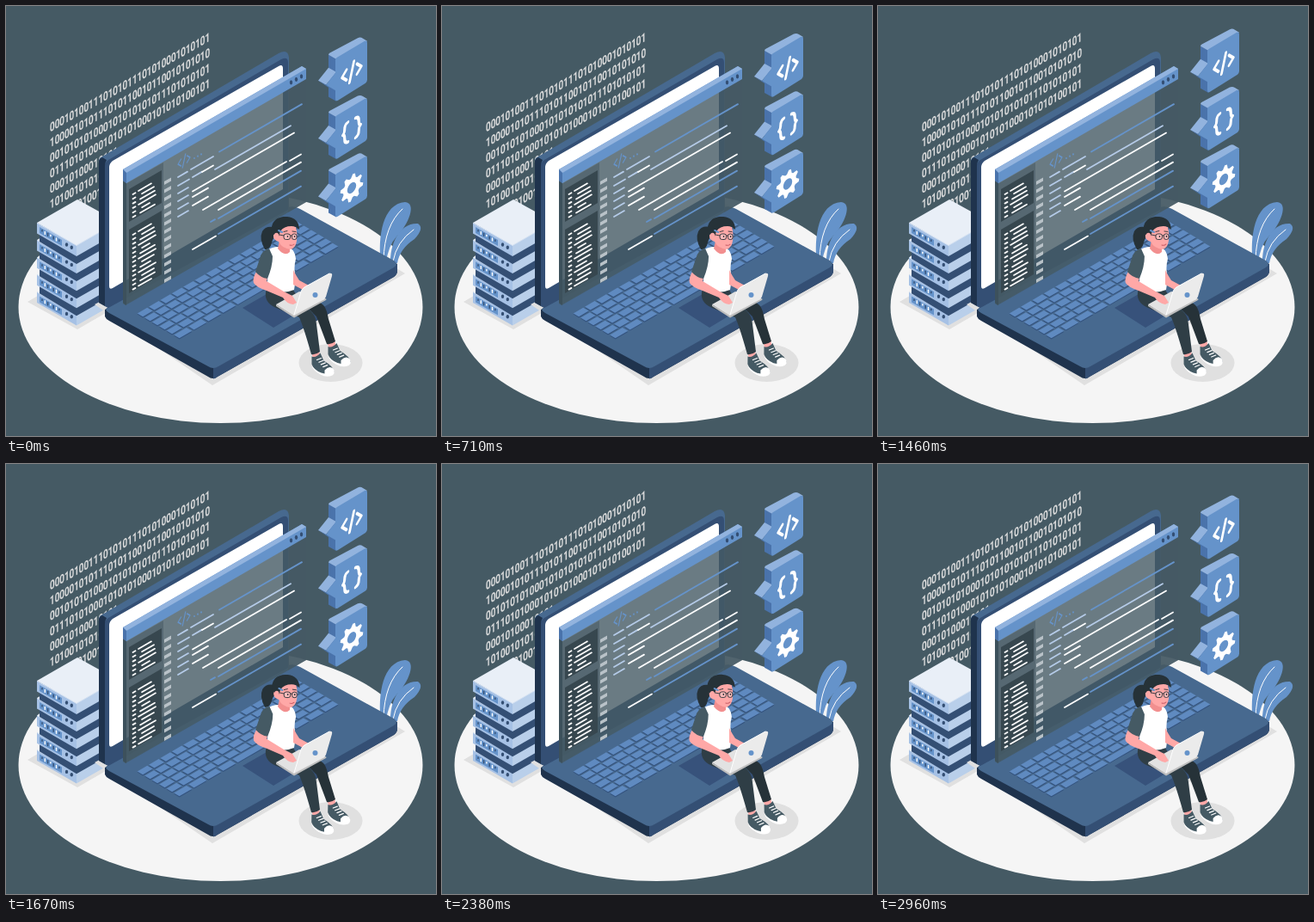
Recreate the animation shown at these times as an HTML page. Size 500 by 500 pixels, loop 3000 ms.

```html
<!DOCTYPE html>
<html lang="en">
<head>
<meta charset="utf-8">
<title>Isometric programming scene</title>
<style>
html,body{margin:0;width:100%;height:100%;overflow:hidden;background:#455a64}
svg{display:block;width:100vw;height:100vh}
</style>
</head>
<body>
<svg id="stage" viewBox="0 0 500 500"></svg>
<script>
const C = {
  bg: '#455a64', ink: '#263238', slate: '#37474f', floor: '#f5f5f5', shade: '#e0e0e0',
  blue: '#6593ca', light: '#92b3de', side: '#4a73ab', navy: '#344f74', deep: '#1f334d',
  base: '#47698f', skin: '#ffa8a7', pale: '#b5cbe8', white: '#fff'
};
const SLOPE = -0.577;
const poly = (pts, fill, extra = '') => `<polygon points="${pts}" fill="${fill}" ${extra}/>`;
const path = (d, fill, extra = '') => `<path d="${d}" fill="${fill}" ${extra}/>`;
const line = (d, color, w = 1.5) => path(d, 'none', `stroke="${color}" stroke-width="${w}" stroke-linecap="round" stroke-linejoin="round"`);
const oval = (x, y, rx, ry, fill, extra = '') => `<ellipse cx="${x}" cy="${y}" rx="${rx}" ry="${ry}" fill="${fill}" ${extra}/>`;
const group = (id, body) => `<g id="${id}">${body}</g>`;
const times = (n, f) => Array.from({length: n}, (_, i) => f(i)).join('');
// Dash running along the left-to-right isometric axis
const dash = (x, y, len, color, w) => line(`M${x} ${y}l${len} ${len * SLOPE}`, color, w);

function binary() {
  const rows = [
    '000101001110101011101010001010101',
    '100001010111010110010110010101010',
    '001010101000101010101011101010101',
    '011101010001010101000101010100101',
    '00010100010101', '10100101010101'
  ];
  const row = (s, x, y) => `<text transform="matrix(.71 -.405 0 1 ${x} ${y})">${s}</text>`;
  return `<g fill="#e0e0e0" stroke="#e0e0e0" stroke-width=".3" font-family="Roboto, Inter, sans-serif" font-size="14" font-weight="500">` +
    rows.map((s, i) => row(s, 51, 146.5 + i * 17.9)).join('') + row('01001', 83, 236) + '</g>';
}

function server(i) {
  const y = i * 20.1;
  const gap = i < 4 ? poly('39,264 82,289 126,264 126,275 82,300 39,274', C.navy) : '';
  return `<g transform="translate(0 ${y})">` + gap +
    poly('36,252 83,225 130,251 82,278.5', '#e9eff7') +
    poly('36,252 82,278.5 82,291 36,264.5', '#a6c1e5') +
    poly('82,278.5 130,251 130,263.5 82,291', '#b9cfea') +
    line('M36.500 252.500L82 278.500L129 251.500', '#d4e1f2', 1) +
    poly('39,257 65,272 65,279 39,264', C.blue) +
    times(7, k => line(`M${42 + k * 3.3} ${260.5 + k * 1.9}v${k % 3 ? 3 : 1.5}`, k % 2 ? C.white : C.navy, 1.4)) +
    oval(70.5, 277.5, 1.7, 2.2, C.navy) + oval(76.3, 280.8, 1.7, 2.2, C.navy) + '</g>';
}

function keyboard() {
  const at = (u, v) => [152 + 187 * u + 51 * v, 357 - 108 * u + 30 * v].map(n => n.toFixed(1)).join();
  const key = (a, b, r) => {
    const v0 = (r + .08) / 6, v1 = (r + .84) / 6;
    const pts = [at(a, v0), at(b, v0), at(b, v1), at(a, v1)].join(' ');
    return poly(pts, '#34537e', 'transform="translate(0 1.2)"') + poly(pts, '#5f8ac0');
  };
  return times(6, r => {
    const cols = [14, 15, 15, 14, 14, 11][r];
    return times(cols, c => {
      if (r === 5 && c > 3 && c < 7) return c === 4 ? key(4 / 11, 6.86 / 11, r) : '';
      return key(c / cols, (c + .86) / cols, r);
    });
  });
}

function laptop() {
  return poly('103,347 240,441 464,311 330,230', C.shade) +
    path('M115 353V361Q116 364 120 366L235 431Q240 435 246 431L451 315Q455 312 455 308V300L334 234Z', C.deep) +
    path('M241 420V433.500Q244 433 246 431L451 315Q455 312 455 308V300Z', C.navy) +
    path('M120 357L235 419Q241 423 247 419L451 304Q457 300 451 296L342 236Q335 232 328 234L119 350Q113 353 120 357Z', C.base) +
    path('M108 180Q108 177 112 175L317 55Q328 49 329 60V237L119 351L108 345Z', C.base) +
    path('M115 186Q115 182 119 179L320 62Q328 58 328 66V237L119 351L115 349Z', C.navy) +
    path('M108 180Q109 177 112 176L117 179Q115 182 115 186V349L108 345Z', C.deep) +
    path('M120 188Q120 183 124 180L317 70Q322 67 322 73V213L124 328Q120 330 120 326Z', C.white) +
    keyboard() +
    poly('275,351 317,327 354,348 311,374', '#37527b');
}

function appWindow() {
  const panel = (y, h, rows) =>
    poly(`143,${y} 181,${y - 22} 181,${y + h - 22} 143,${y + h}`, C.slate) +
    times(rows, i => {
      const ly = y + 7 + i * 5.3, inset = (i * 5) % 3;
      return dash(147.500, ly - 1, 3, C.white, 1.8) +
        dash(154 + inset * 2, ly - 5 - inset, 20 - inset * 3 - (i % 4 === 0 ? 5 : 0), C.white, 1.7);
    });
  const code = [
    [248, 169.5, 96, C.blue], [200, 199, 11, C.pale], [215, 190, 26, C.pale],
    [200, 209, 13, C.pale], [217, 199, 11, C.pale], [228, 193, 13, C.white],
    [243, 190, 88, C.pale], [217, 215.5, 118, C.white],
    [200, 218, 12, C.pale], [217, 222, 18, C.white], [200, 227, 12, C.pale],
    [200, 236, 12, C.pale], [217, 232, 18, C.white], [200, 245, 12, C.pale],
    [229, 237, 97, C.white], [330, 180, 13, C.white], [247, 237, 96, C.white],
    [238, 251, 5, C.blue], [247, 247, 96, C.blue], [247, 265, 96, C.blue],
    [217, 283, 27, C.white]
  ];
  return poly('136,194 349,74 349,228 139,348 136,346', C.bg, 'opacity=".8"') +
    poly('328,86 349,74 349,228 328,240', C.bg, 'opacity=".65"') +
    poly('139,207 183,182 183,322 139,347', C.bg, 'opacity=".55"') +
    poly('136,192 140,195 140,348 136,345', '#3d515c') +
    poly('136,190 344,70 349,73 349,85 140,206 136,203', C.blue) +
    poly('136,190 344,70 349,73 140,194', C.light) +
    poly('136,190 140,194 140,206 136,203', C.side) +
    times(3, i => oval(331.500 + i * 6, 88.8 - i * 3.5, 1.7, 2.6, C.navy)) +
    panel(213, 38, 6) + panel(260, 74, 13) +
    times(13, i => poly(`184,${204 + i * 9.5} 192,${199.4 + i * 9.5} 192,${203.4 + i * 9.5} 184,${208 + i * 9.5}`, '#b9c2c8')) +
    `<g transform="matrix(.866 -.5 0 1 207 180)">${line('M-4 -4L-8 0L-4 4M4 -4L8 0L4 4M2 -7L-2 7', C.blue, 1.5)}</g>` +
    times(3, i => oval(219 + i * 4, 177 - i * 2.3, .9, 1.1, C.blue)) +
    code.map(([x, y, n, color]) => dash(x, y, n, color, 1.8)).join('');
}

function gear() {
  const pts = [];
  for (let i = 0; i < 32; i++) {
    const a = (i - 1.5) * Math.PI / 16, r = i % 4 < 2 ? 11.5 : 15.5;
    pts.push(`${(r * Math.cos(a)).toFixed(1)} ${(r * Math.sin(a)).toFixed(1)}`);
  }
  return path(`M${pts.join('L')}ZM6 0A6 6 0 1 0 -6 0A6 6 0 1 0 6 0Z`, C.white, 'fill-rule="evenodd"');
}

function badge(i) {
  const marks = [
    line('M-7 -6L-13 0L-7 6M7 -6L13 0L7 6M3 -11L-3 11', C.white, 3.4),
    line('M-5 -11.500Q-9.500 -11 -9.500 -6Q-9.500 -1 -12 0Q-9.500 1 -9.500 6Q-9.500 11 -5 11.500M5 -11.500Q9.500 -11 9.500 -6Q9.500 -1 12 0Q9.500 1 9.500 6Q9.500 11 5 11.500', C.white, 3.6),
    gear()
  ];
  return `<g transform="translate(0 ${.7 + i * 67.4})">` +
    poly('375,56 384,60 384,110 375,105', C.side) +
    path('M375 56Q375 54 378 53L409 36.500Q412 35 415 37L420 40L384 61Z', C.light) +
    poly('363,86 375,71 384,76 372,91', C.light) +
    poly('363,86 372,91 384,96 384,100', C.side) +
    poly('372,91 384,76 384,98', C.blue) +
    path('M383 62Q383 60 385 59L417 40Q420 39 420 42V85Q420 87 418 89L386 109Q383 111 383 107Z', C.blue) +
    `<g transform="matrix(.866 -.5 0 1 402 76)">${marks[i]}</g></g>`;
}

function plant() {
  return path('M436 300C432 268 438 230 464 228C478 229 468 254 455 267Q444 279 442 299Z', C.blue) +
    line('M439 295Q440 255 461 236', C.white, 1) +
    path('M447 301C446 277 457 252 479 253Q487 258 475 271Q458 282 455 299Z', C.blue) +
    line('M450 297Q454 274 474 260', C.white, 1);
}

const shoe = (x, y) => `<g transform="translate(${x} ${y})">` +
  path('M0 0Q5 2 10 -4L14 5Q26 12 26 18Q22 24 12 21Q3 17 0 9Z', C.bg) +
  path('M15 16Q20 10 25 14Q28 19 24 22Q17 25 10 21Q2 17 0 11Q7 19 15 20Z', C.white) +
  times(4, k => line(`M${6 + k * 2.4} ${4 + k * 2.7}l5 -2`, C.white, 1.2)) + '</g>';

function legs() {
  const foot = (id, ankle, x, y) => group(id, poly(ankle, C.skin) + shoe(x, y));
  return foot('rightFoot', '373,390 382,388 384,397 376,399', 374.500, 396) +
    foot('leftFoot', '355,401 364,400 365,408 357,410', 355.500, 407.5) +
    path('M332 333Q361 339 370 349Q373 353 375 364L383 390Q378 394 373 393L361 361Z', C.ink) +
    path('M303 329Q298 344 314 351L341 362Q346 373 355 405Q360 406 365 402L361 370Q360 355 345 349L334 330Z', '#2f3e46');
}

function head() {
  return path('M314 258Q303 254 298 262Q294 271 301 283Q307 284 309 275Q311 268 315 267Z', C.ink) +
    path('M318 273L330 278V286Q324 292 316 282Z', '#f28f8f') +
    path('M312 261Q324 249 337 257Q339 264 338 273Q337 281 331 283Q321 282 317 274Q310 272 311 266Z', C.skin) +
    path('M309 264C307 250 316 244 327 245C336 246 341 251 341 260Q337 256 332 256Q323 256 319 262L317 268Q312 267 309 264Z', C.ink) +
    oval(314.500, 267.500, 2.8, 3.7, C.skin) +
    line('M317 261L321 263', C.blue, 2) +
    `<g stroke="${C.ink}" stroke-width=".9"><rect x="323" y="265" width="7.500" height="6.500" rx="2.500" fill="#ffbcbc"/><rect x="332.500" y="265" width="5.500" height="6.500" rx="2.300" fill="#ffbcbc"/></g>` +
    line('M318 266L323 267M330.500 267h2M323 262.500l4 -1M333 262l4 .5', C.ink, .9) +
    oval(327.500, 268, .8, 1.1, C.ink) + oval(335.500, 268, .8, 1.1, C.ink) +
    line('M330 278Q333 279 335 277', '#c85b65', 1);
}

function torso() {
  return path('M302 285Q309 280 317 280Q323 289 329 281Q336 283 337 294Q334 304 337 317L335 330Q318 337 303 328Q306 312 302 300Z', C.white) +
    path('M334 307Q337 313 341 319L354 326Q353 331 347 331L334 324Z', C.skin);
}

function arm() {
  return path('M293 306Q286 316 288 322Q291 327 303 331L322 339Q326 346 334 347L338 345L333 337L323 332L303 320L305 311Z', C.skin) +
    path('M306 282Q297 284 295 294L290 309Q296 316 304 317Q310 303 310 291Z', C.bg);
}

function tablet() {
  return poly('314,347 341,332 373,341 335,361', '#e2e2e2') +
    path('M314 347L335 360L372 340V342L335 362.500L314 349Z', '#bdbdbd') +
    path('M335 359L343 332Q344 329 347 327L376 311Q380 310 379 314L372 338Q371 341 368 342Z', '#ebebeb') +
    line('M335 359L343 332Q344 329 347 327L376 311', C.white, 1) +
    oval(359.500, 336, 3, 3, C.blue);
}

const stage = document.getElementById('stage');
stage.innerHTML = `<rect width="500" height="500" fill="${C.bg}"/>` + binary() +
  oval(249.5, 350, 235, 135, C.floor) +
  poly('25,344 83,376 140,343 78,313', C.shade) +
  times(5, i => server(4 - i)) +
  plant() + laptop() + appWindow() +
  group('badges', times(3, badge)) +
  oval(377.500, 415, 37, 22, C.shade) +
  legs() + group('body', torso()) + group('head', head()) +
  tablet() + group('arm', arm());

const [badges, body, headPart, armPart, leftFoot, rightFoot] =
  ['badges', 'body', 'head', 'arm', 'leftFoot', 'rightFoot'].map(id => document.getElementById(id));
const move = (el, value) => el.setAttribute('transform', value);

function draw(ms) {
  const phase = (ms % 3000) / 3000 * Math.PI * 2;
  const sway = Math.sin(phase * 2);
  move(badges, `translate(0 ${-5 * (1 - Math.cos(phase))})`);
  move(headPart, `rotate(${sway * 1.3} 322 284)`);
  move(body, `rotate(${sway * .3} 320 330)`);
  move(armPart, `rotate(${sway * .5} 334 345)`);
  move(leftFoot, `rotate(${sway * 2} 360 403)`);
  move(rightFoot, `rotate(${sway * 2} 378 391)`);
}

const start = performance.now();
function tick() {
  draw(performance.now() - start);
  requestAnimationFrame(tick);
}
tick();
</script>
</body>
</html>
```
